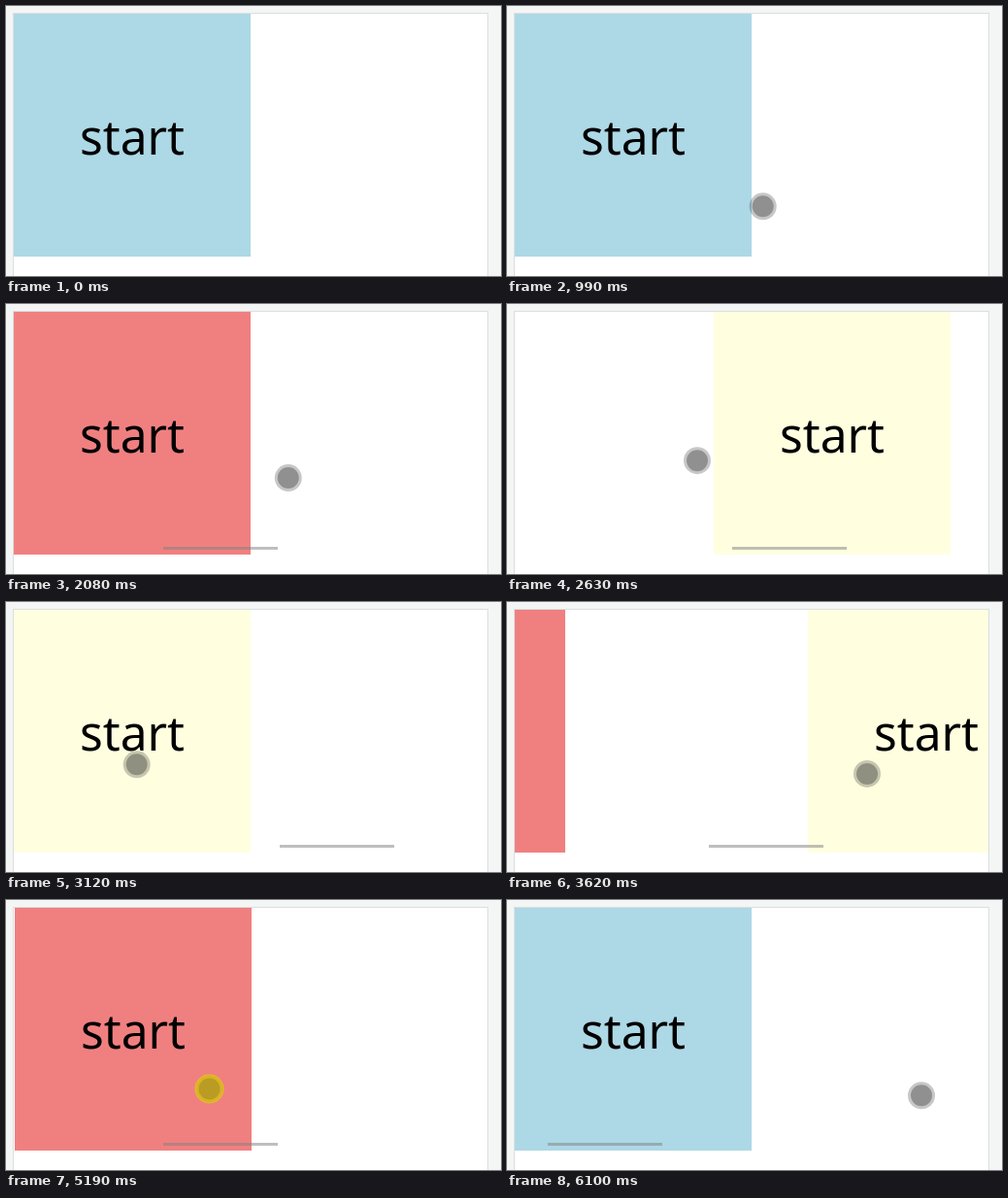
These frames come from a looping animation (510 by 278 pixels, 6.23 s). An HTML page with a canvas:

```html
<!DOCTYPE html>
<html lang="en">
<head>
<meta charset="utf-8">
<title>Snap carousel</title>
<style>
  html, body { margin: 0; width: 100%; height: 100%; overflow: hidden; background: #f3f6f5; }
  canvas { display: block; }
</style>
</head>
<body>
<canvas id="stage" width="510" height="278"></canvas>
<script>
const ctx = document.getElementById('stage').getContext('2d');
const LOOP = 6230, ENTER = 450, GLIDE = 600, SNAP = 400;
const VIEW = { x: 8, y: 8, w: 488, h: 250 };
const PANEL = VIEW.w / 2, STEP = 494;
const COLORS = ['#add8e6', '#f08080', '#ffffe0'];

const clamp = u => Math.min(1, Math.max(0, u));
const smooth = u => u * u * (3 - 2 * u);
const mix = (a, b, k) => a + (b - a) * k;

// A pull sideways also drifts a little in y
const drag = (press, release, x, y, dx) =>
  ({ press, release, dx, from: { x, y }, to: { x: x + dx, y: y + dx / 32 } });

const drags = [
  drag(1020, 1197, 262, 206, -260),
  drag(2320, 2598, 446, 169, -250),
  drag(3300, 3578, 118, 169, 253),
  drag(4301, 4600, 213, 178.4, 115),
  drag(5182, 5496, 209, 194.5, 218)
];

// Each release snaps to the nearest panel, biased along the pull
let rest = 0;
for (const d of drags) {
  d.start = rest;
  d.held = rest - d.dx;
  d.snap = rest = STEP * Math.round(d.held / STEP - 0.1 * Math.sign(d.dx));
}

const entry = { release: ENTER, to: { x: 490, y: 248 } };

function between(a, b, k) {
  return { x: mix(a.x, b.x, k), y: mix(a.y, b.y, k) };
}

const pull = (d, t) => smooth(clamp((t - d.press) / (d.release - d.press)));

function pointerAt(t, last) {
  const d = drags[last] || entry, next = drags[last + 1];
  if (t < d.release) return last < 0 ? null : between(d.from, d.to, pull(d, t));
  if (!next) return d.to;
  const leave = Math.max(d.release, next.press - GLIDE);
  return between(d.to, next.from, smooth(clamp((t - leave) / (next.press - leave))));
}

function scrollAt(t, d) {
  if (!d) return 0;
  if (t < d.release) return mix(d.start, d.held, pull(d, t));
  const left = 1 - clamp((t - d.release) / SNAP);
  return mix(d.snap, d.held, left * left);
}

function box(x, y, w, h, color) {
  ctx.fillStyle = color;
  ctx.fillRect(x, y, w, h);
}

function disc(x, y, r, color) {
  ctx.fillStyle = color;
  ctx.beginPath();
  ctx.arc(x, y, r, 0, 7);
  ctx.fill();
}

function drawArrow(x, y) {
  const fill = ctx.createLinearGradient(x, y, x, y + 30);
  fill.addColorStop(0.2, '#a03cb0');
  fill.addColorStop(0.7, '#f08078');
  ctx.save();
  ctx.fillStyle = fill;
  ctx.strokeStyle = '#111';
  ctx.lineWidth = 1.2;
  ctx.translate(x + 0.5, y + 0.5);
  const shape = new Path2D('M0 0L19 19L11 20L15 28L10 30L6 22L0 28Z');
  ctx.translate(-x, -y);
  const placed = new Path2D();
  placed.addPath(shape, { e: x, f: y });
  ctx.fill(placed);
  ctx.stroke(placed);
  ctx.restore();
}

function drawPointer({ x, y }, pressed) {
  if (x < VIEW.x) return drawArrow(x, y);
  if (pressed) disc(x, y, 15, 'rgba(225,205,15,.8)');
  disc(x, y, 14, `rgba(32,32,32,${pressed ? 0.06 : 0.25})`);
  disc(x, y, 11, `rgba(32,32,32,${pressed ? 0.16 : 0.33})`);
}

function drawPanels(scroll) {
  ctx.save();
  ctx.beginPath();
  ctx.rect(VIEW.x, VIEW.y, VIEW.w, VIEW.h);
  ctx.clip();
  ctx.font = '49.7px "Noto Sans", "Open Sans", sans-serif';
  ctx.textAlign = 'center';
  COLORS.forEach((color, i) => {
    const x = VIEW.x + i * STEP - scroll;
    box(x, VIEW.y, PANEL, VIEW.h, color);
    ctx.fillStyle = '#000';
    ctx.fillText('start', x + PANEL / 2, 153);
  });
  ctx.restore();
}

function draw(t) {
  const last = drags.filter(d => d.press <= t).length - 1;
  const current = drags[last];
  const scroll = Math.round(scrollAt(t, current));
  box(0, 0, 510, 278, '#f3f6f5');
  box(7, 7, 490, 271, '#dcdfde');
  box(8, 8, 488, 270, '#fff');
  drawPanels(scroll);
  if (current) box(Math.round(42 + scroll * 0.2425), 250, 118, 3, 'rgba(128,128,128,.5)');
  const pointer = pointerAt(t, last);
  if (pointer) drawPointer(pointer, current && t < current.release);
}

const begin = performance.now();
function tick() {
  draw((performance.now() - begin) % LOOP);
  requestAnimationFrame(tick);
}
tick();
</script>
</body>
</html>
```
